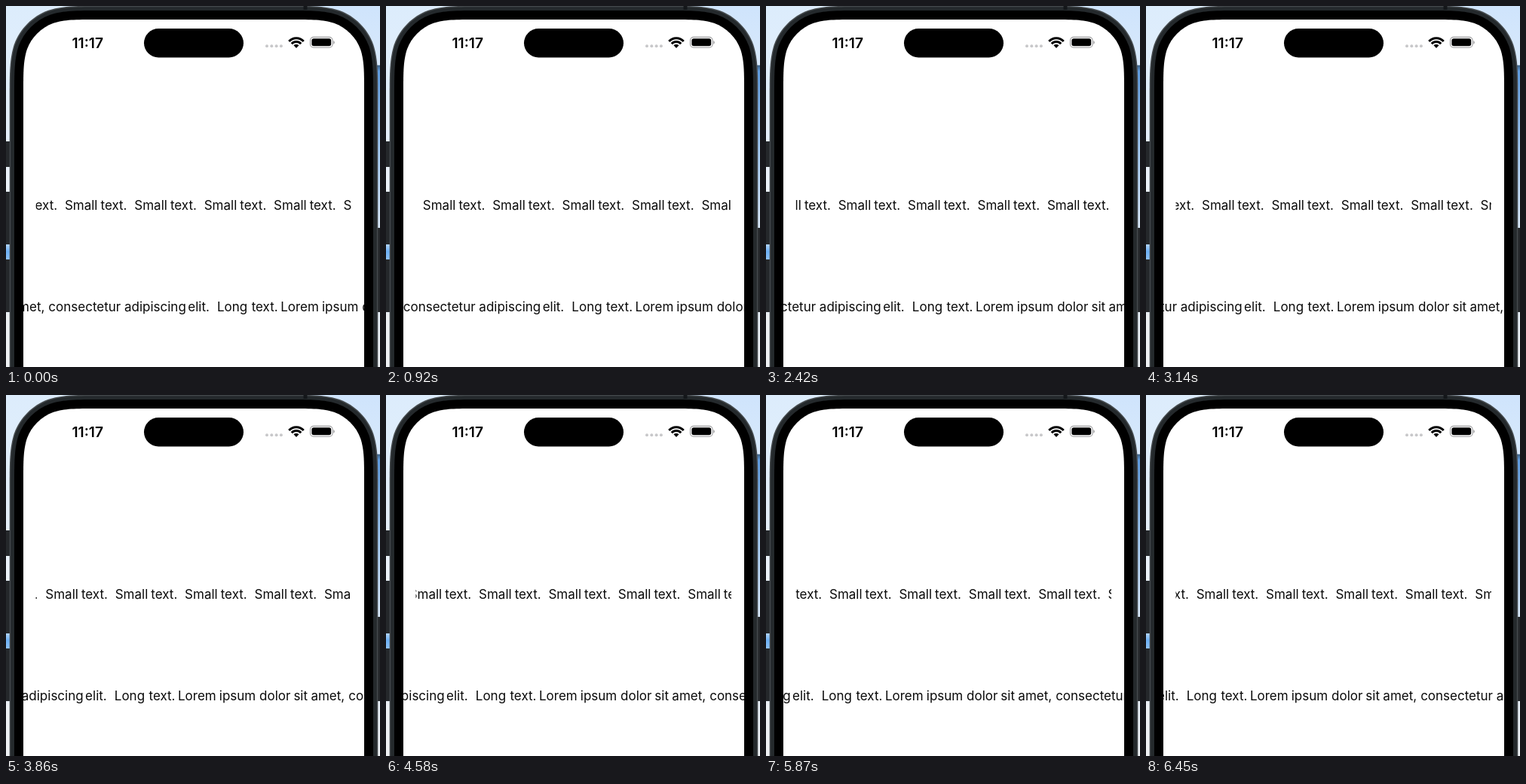
These frames come from a looping animation (496x480 px, 6.5 s). An HTML page:

```html
<!DOCTYPE html>
<html lang="en">
<head>
<meta charset="utf-8">
<title>Marquee text</title>
<style>
  html, body { margin: 0; width: 100%; height: 100%; overflow: hidden; background: #e6f0fa; }
  svg { display: block; width: 496px; height: 480px; }
  text { font-family: Inter, "Liberation Sans", sans-serif; font-size: 17px; fill: #0a0a0a; }
  .clock { font-size: 19.2px; font-weight: 600; fill: #000; text-anchor: middle; }
</style>
</head>
<body>
<svg viewBox="0 0 496 480">
  <defs>
    <linearGradient id="skyLeft" x2="0" y2="1">
      <stop offset="0" stop-color="#dcecfc"/>
      <stop offset=".37" stop-color="#e6f0fa"/>
      <stop offset=".5" stop-color="#eef4fa"/>
      <stop offset=".65" stop-color="#d6e8fb"/>
      <stop offset=".68" stop-color="#6cb0f5"/>
      <stop offset=".72" stop-color="#a8cdf3"/>
      <stop offset=".86" stop-color="#eef2f5"/>
      <stop offset="1" stop-color="#f0f3f5"/>
    </linearGradient>
    <linearGradient id="skyRight" x2="0" y2="1">
      <stop offset="0" stop-color="#cfe4fc"/>
      <stop offset=".163" stop-color="#d8e9fb"/>
      <stop offset=".165" stop-color="#3f6285"/>
      <stop offset=".18" stop-color="#5f9bdd"/>
      <stop offset=".4" stop-color="#a3cbf4"/>
      <stop offset=".6" stop-color="#d5e6f7"/>
      <stop offset="1" stop-color="#eef2f5"/>
    </linearGradient>
    <clipPath id="smallBox"><rect x="39.5" y="240" width="418.5" height="50"/></clipPath>
    <clipPath id="longBox"><rect x="22" y="375" width="454" height="50"/></clipPath>
  </defs>

  <rect width="248" height="480" fill="url(#skyLeft)"/>
  <rect x="248" width="248" height="480" fill="url(#skyRight)"/>

  <g fill="#25282b">
    <rect x="-4" y="180" width="11" height="34" rx="1"/>
    <rect x="-4" y="247" width="11" height="70" rx="1"/>
    <rect x="-4" y="337" width="11" height="70" rx="1"/>
    <rect x="491" y="295" width="9" height="112" rx="1"/>
  </g>

  <g id="phone"></g>
  <path d="M397 0v5" stroke="#14171a" stroke-width="5"/>

  <rect x="183" y="30" width="132" height="38.5" rx="19.25"/>
  <text class="clock" x="108.2" y="55.5">11:17</text>
  <g fill="#c8c8ca">
    <circle cx="346" cy="53.3" r="2"/>
    <circle cx="352.3" cy="53.3" r="2"/>
    <circle cx="358.6" cy="53.3" r="2"/>
    <circle cx="364.9" cy="53.3" r="2"/>
  </g>
  <g transform="translate(385 48.4) scale(1.07) translate(-385 -48.6)">
    <g fill="none" stroke="#000" stroke-width="2.8">
      <path d="M375.9 47.3A12.2 12.2 0 0 1 394.1 47.3"/>
      <path d="M379.2 50.3A7.8 7.8 0 0 1 390.8 50.3"/>
    </g>
    <path d="M385 55.6L381.7 52.3A4.7 4.7 0 0 1 388.3 52.3Z"/>
  </g>
  <rect x="403.5" y="41.4" width="29.6" height="13.8" rx="4.4" fill="none" stroke="#9c9c9e" stroke-width="1.1"/>
  <rect x="405.4" y="43.3" width="25.8" height="10" rx="2.7"/>
  <path d="M434.3 46v4.8q1.5-.7 1.5-2.4t-1.5-2.4Z" fill="#9c9c9e"/>

  <g clip-path="url(#smallBox)"><g id="small"></g></g>
  <g clip-path="url(#longBox)"><g id="long"></g></g>
</svg>
<script>
  const NS = "http://www.w3.org/2000/svg";
  const LOOP = 6500, STEP = 71.88, RESUME = 340;
  const SCREEN = { left: 23, right: 475, top: 18, radius: 63.25 };

  function add(parent, tag, attrs) {
    const el = document.createElementNS(NS, tag);
    for (const name in attrs) el.setAttribute(name, attrs[name]);
    return parent.appendChild(el);
  }

  // Screen outline with smooth corners, grown outwards by `grow`.
  function outline(grow) {
    const r = SCREEN.radius + grow;
    const left = SCREEN.left - grow, right = SCREEN.right + grow, top = SCREEN.top - grow;
    const corner = [
      [0, 1.529], [0, 1.088], [0, 0.868], [0.075, 0.631],
      [0.169, 0.373], [0.373, 0.169], [0.631, 0.075],
      [0.868, 0], [1.088, 0], [1.529, 0]
    ];
    const west = corner.map(([x, y]) => [left + x * r, top + y * r]);
    const east = corner.map(([x, y]) => [right - x * r, top + y * r]).reverse();
    const curve = ([first, ...rest]) => `${first} C${rest.join(" ")}`;
    return `M${left},500 L${curve(west)} L${curve(east)} V500Z`;
  }

  const phone = document.getElementById("phone");
  for (const [grow, fill] of [[18.3, "#44494c"], [16.8, "#24292c"], [12, "#000"], [0, "#fff"]]) {
    add(phone, "path", { d: outline(grow), fill });
  }

  // Each word has its own offset within one repeat of the phrase.
  function marquee(id, y, start, speed, period, words) {
    const group = document.getElementById(id);
    for (let i = 0; i * period < 496 + 2 * period; i++) {
      for (const [word, dx] of words) {
        add(group, "text", { x: i * period + dx, y }).textContent = word;
      }
    }
    return time => {
      const x = start - speed * time;
      const wrapped = ((x % period) + period) % period - period;
      group.setAttribute("transform", `translate(${wrapped.toFixed(2)} 0)`);
    };
  }

  const rows = [
    marquee("small", 271.4, 76.4, 0.03016, 92.4, [["Small", 0], ["text.", 47.6]]),
    marquee("long", 405.7, 278.2, 0.0348, 534, [
      ["Long", 0], ["text.", 45.7], ["Lorem", 84.2], ["ipsum", 139], ["dolor", 192.3],
      ["sit", 237.6], ["amet,", 260.6], ["consectetur", 310.4],
      ["adipiscing", 411], ["elit.", 495.3]
    ])
  ];

  // The scroll starts with a short stall, then advances in even steps.
  function scrollTime(t) {
    if (t < 70) return -50;
    if (t < RESUME) return 70;
    return RESUME + Math.floor((t - RESUME) / STEP + 0.2) * STEP;
  }

  function draw(t) {
    const time = scrollTime(t);
    rows.forEach(move => move(time));
  }

  const origin = performance.now();
  function tick() {
    draw((performance.now() - origin) % LOOP);
    requestAnimationFrame(tick);
  }
  tick();
</script>
</body>
</html>
```
